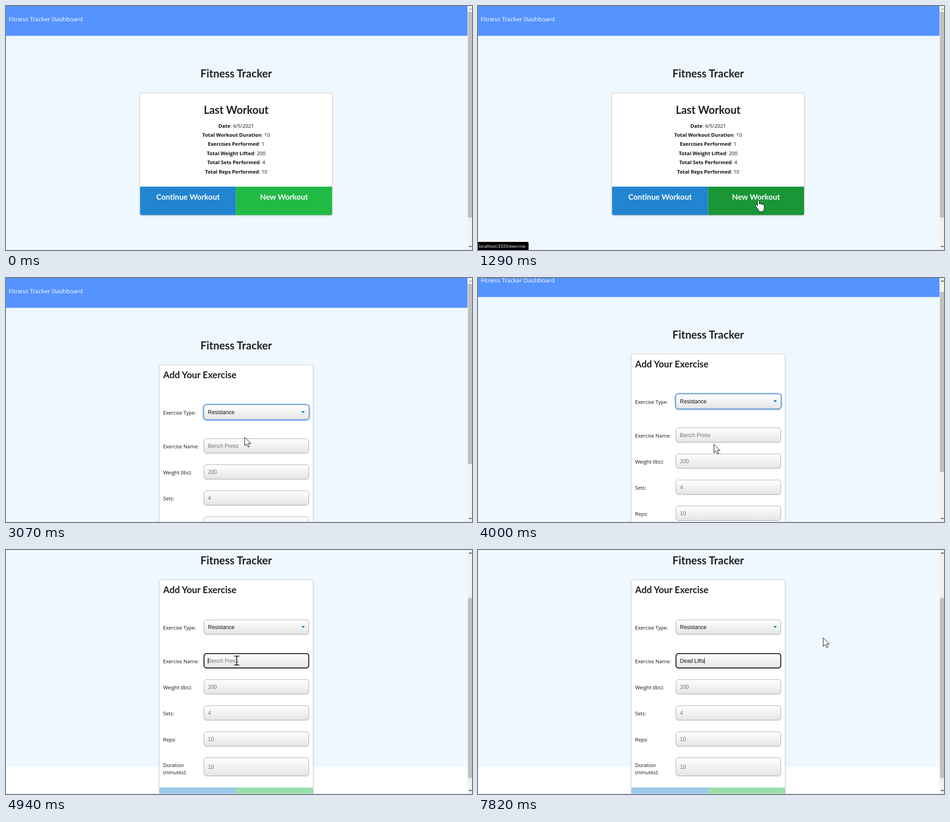
An HTML page that plays this animation: 1032x543 px, repeating every 8000 ms.

```html
<!DOCTYPE html>
<html lang="en">
<head>
<meta charset="utf-8">
<title>Fitness Tracker</title>
<style>
  html, body { margin: 0; width: 100%; height: 100%; overflow: hidden; background: #fff; }
  svg { display: block; width: 1032px; height: 543px; }
  text { white-space: pre; }
  .ui { font-family: "Open Sans", "Noto Sans", sans-serif; font-size: 11.15px; fill: #111; }
  .nav { font-size: 13.3px; fill: #fff; }
  .tip { font-size: 9.56px; fill: #fff; }
  .head { font-family: Lato, sans-serif; font-weight: 700; fill: #1f2021; }
  .h1 { font-size: 23.8px; }
  .h2 { font-size: 20.4px; }
  .btn { font-size: 17px; fill: #fff; }
  .field { font-family: "Liberation Sans", Arial, sans-serif; font-size: 11.9px; fill: #111; }
  .hint { fill: #757575; }
  .mid { text-anchor: middle; }
  .bold { font-weight: 700; }
  .card { fill: #fff; stroke: #d4d4d5; filter: drop-shadow(0 1px 1.5px rgba(0, 0, 0, .2)); }
  .popup { fill: #fff; stroke: #8a8a8a; filter: drop-shadow(0 2px 3px rgba(0, 0, 0, .3)); }
  .pointer { fill: #fff; stroke: #000; stroke-linejoin: round; }
</style>
</head>
<body>
<svg id="stage" viewBox="0 0 1032 543"></svg>
<script>
const LOOP = 8000;
const BLUE = '#2185d0', GREEN = '#21ba45', PRESSED = '#1a9637';
const CENTER = 509.7;

const text = (cls, x, y, content, extra = '') =>
  `<text class="${cls}" x="${x}" y="${y}" ${extra}>${content}</text>`;
const rect = (x, y, w, h, attrs) =>
  `<rect x="${x}" y="${y}" width="${w}" height="${h}" ${attrs}/>`;
const group = (id, content) => `<g id="${id}">${content}</g>`;

// A pair of buttons filling the foot of a card
function buttons(x, y, w, h, left, right, baseline, id) {
  const r = 3.4, half = w / 2;
  return `<path fill="${BLUE}" d="M${x} ${y}h${half}v${h}h${r - half}q${-r} 0 ${-r} ${-r}z"/>
    <path id="${id}" fill="${GREEN}" d="M${x + half} ${y}h${half}v${h - r}q0 ${r} ${-r} ${r}h${r - half}z"/>` +
    text('head btn mid', x + half / 2, baseline, left) +
    text('head btn mid', x + half * 1.5, baseline, right);
}

const card = (x, y, w, h, id) => rect(x, y, w, h, `id="${id}" class="card" rx="3.4"`);

const field = (y, h = 32, id = '') =>
  rect(438.5, y + 1.5, 232, h, 'rx="6" fill="none" stroke="#000" stroke-opacity=".05" stroke-width="2"') +
  rect(438.5, y, 232, h, `id="${id}" rx="5.5" fill="url(#shade)" stroke="#aaa"`);

const row = (label, value, y, id = '') =>
  text('ui', 348, y + 21.5, label) + field(y, 32, id) +
  text('field hint', 447.3, y + 20.5, value, id && `id="${id}Text"`);

const summary = [
  ['Date', '4/5/2021'], ['Total Workout Duration', 10], ['Exercises Performed', 1],
  ['Total Weight Lifted', 200], ['Total Sets Performed', 4], ['Total Reps Performed', 10]
].map(([name, value], i) => text('ui mid', CENTER, 270.5 + i * 20.4,
  `<tspan class="bold">${name}</tspan>: ${value}`)).join('');

const home = card(296.5, 193.5, 426, 272, 'homeCard') +
  text('head h1 mid', CENTER, 239.5, 'Last Workout') + summary +
  buttons(297, 402, 425, 63.2, 'Continue Workout', 'New Workout', 430.5, 'newButton');

const details = row('Exercise Name:', 'Bench Press', 357.5, 'name') +
  row('Weight (lbs):', '200', 415.5) + row('Sets:', '4', 473.5) + row('Reps:', '10', 531.5) +
  text('ui', 348, 610, 'Duration') + text('ui', 348, 626, '(minutes):') +
  field(589.5, 40) + text('field hint', 447.3, 614, '10') +
  rect(447, 367, 1, 13, 'id="caret"');

const options = ['Select Exercise Type', 'Resistance', 'Cardio'];
const popup = rect(438.5, 315.5, 232, 78, 'class="popup"') +
  rect(439, 316, 231, 26, 'id="choice" fill="#1e90ff"') +
  options.map((o, i) => text('field option', 447.3, 333 + i * 26, o)).join('');

const form = card(339.5, 193.5, 340.5, 190.5, 'formCard') +
  text('head h2', 348, 223, 'Add Your Exercise') +
  text('ui', 348, 304, 'Exercise Type:') +
  rect(437, 281.2, 235, 35, 'id="ring" rx="7.5" fill="none" stroke="#3b99fc" stroke-opacity=".7" stroke-width="3"') +
  field(282.5, 32, 'type') + text('field', 447.3, 303, '', 'id="typeText"') +
  '<path d="M654.8 296.8h6.4L658 300z" fill="#007cb2" stroke="#007cb2" stroke-linejoin="round"/>' +
  group('details', details) +
  `<g id="foot" opacity=".45">${buttons(340, 340.5, 340, 43.2, 'Complete', 'Add Exercise', 369, 'addButton')}</g>` +
  group('popup', popup);

const pointers = {
  arrow: '<path class="pointer" d="M.5.5V19.5L5 15.3 8.2 22.3 11.2 21 8 14.2H14.3z"/>',
  hand: `<path class="pointer" d="M-2 2a2 2 0 0 1 4 0v7q0-1.5 1.8-1.5t2 2q.3-1.2 1.9-1t1.8 2q.4-1 1.7-.8t1.6 2v6
    q0 3-1.5 5v3H1v-2.5q-1.5-2-3-4.5l-4.5-6q-.8-1.8.8-2.6 1.5-.4 2.7 1.2L-2 13.5z"/>`,
  ibeam: ['#fff" stroke-width="3.4', '#000" stroke-width="1.7'].map(stroke =>
    `<path fill="none" stroke="${stroke}" d="M-6-10h4q2 0 2 2V8q0 2-2 2h-4M6-10h-4q-2 0-2 2M6 10h-4q-2 0-2-2"/>`).join('')
};

document.getElementById('stage').innerHTML =
  `<defs><linearGradient id="shade" x2="0" y2="1"><stop stop-color="#fff"/>
    <stop offset="1" stop-color="#e5e5e5"/></linearGradient></defs>` +
  group('page', rect(0, 0, 1022, 610, 'fill="#f0f8ff"') + rect(0, 0, 1022, 66.3, 'fill="#5593ff"') +
    text('ui nav', 6, 34, 'Fitness Tracker Dashboard') +
    text('head h1 mid', CENTER, 158.5, 'Fitness Tracker') +
    group('home', home) + group('form', form)) +
  rect(1022, 0, 10, 543, 'fill="#f1f1f1"') +
  rect(1023, 13, 9, 458, 'id="thumb" fill="#c1c1c1"') +
  '<path id="up" d="M1025 8l3.5-3.5L1032 8z"/><path fill="#505050" d="M1025 534l3.5 3.5L1032 534z"/>' +
  rect(0, 542, 1032, 1, 'fill="#e4e8ec"') +
  group('status', '<path d="M0 525h109q3 0 3 3v15H0z"/>' + text('ui tip', 1.5, 538, 'localhost:3333/exercise')) +
  '<circle id="click" r="16" fill="#ff0" opacity=".5"/>' +
  group('cursor', Object.entries(pointers).map(([id, art]) => group(id, art)).join(''));

const el = {};
document.querySelectorAll('[id]').forEach(node => el[node.id] = node);
const optionTexts = document.querySelectorAll('.option');
const caretX = [447.3];

// start, end, number of steps, x, y, shape
const moves = [
  [210, 660, 6, 700, 450, 'arrow'],
  [735, 820, 2, 621, 432, 'hand'],
  [1910, 2070, 3, 545, 301, 'arrow'],
  [2690, 2842, 3, 528, 354, 'arrow'],
  [3220, 3300, 2, 528, 338, 'arrow'],
  [3540, 3700, 3, 524, 374, 'ibeam'],
  [4000, 4080, 2, 520, 365, 'arrow'],
  [4480, 4700, 4, 511, 246, 'ibeam'],
  [5080, 5160, 2, 585, 268, 'arrow'],
  [5240, 5320, 2, 690, 262, 'arrow'],
  [5400, 5480, 2, 764, 195, 'arrow']
];
const scrolls = [[4000, 24], [4080, 64], [4160, 102], [4240, 120], [4320, 127]];
const fades = [[970, .6], [1060, 1], [1600, .7], [1680, .35], [1760, 0]];
const typed = 'Dead Lifts';
const keyTimes = [6010, 6240, 6410, 6470, 6730, 7190, 7340, 7570, 7660, 7820];

const between = (t, a, b) => t >= a && t < b;
const show = (node, on) => node.style.display = on ? '' : 'none';
const latest = (list, t) => list.reduce((value, [at, next]) => t >= at ? next : value, 0);
const set = (node, attrs) => Object.entries(attrs).forEach(([k, v]) => node.setAttribute(k, v));

function cursorAt(t) {
  let x = 975, y = 550, shape = 'arrow';
  for (const [start, end, steps, toX, toY, next] of moves) {
    if (t < start) break;
    const part = t >= end ? 1 : (Math.floor((t - start) / (end - start) * (steps - 1)) + 1) / steps;
    x += (toX - x) * part;
    y += (toY - y) * part;
    shape = next;
    if (part < 1) break;
  }
  return { x, y, shape };
}

function drawForm(t) {
  const open = t >= 2994, editing = t >= 4940;
  const hovered = between(t, 1990, 2290);
  set(el.formCard, { height: open ? 505.5 : 190.5 });
  set(el.foot, { transform: `translate(0 ${open ? 315 : 0})` });
  show(el.details, open);
  show(el.ring, between(t, 2290, 4940));
  set(el.type, { stroke: hovered ? '#888' : '#aaa' });
  el.typeText.textContent = options[open ? 1 : 0];

  show(el.popup, between(t, 2290, 2994));
  const chosen = t >= 2766 ? 1 : 0;
  set(el.choice, { y: 316 + chosen * 26 });
  optionTexts.forEach((node, i) => node.style.fill = i === chosen ? '#fff' : '#111');

  const count = keyTimes.filter(at => t >= at).length;
  set(el.name, { stroke: editing ? '#101010' : '#aaa', 'stroke-width': editing ? 2 : 1 });
  el.nameText.textContent = count ? typed.slice(0, count) : 'Bench Press';
  el.nameText.style.fill = count ? '#111' : '';
  show(el.caret, editing && !between(t, 5440, 6010));
  const width = count ? el.nameText.getComputedTextLength() : 0;
  set(el.caret, { x: Math.round(447.3 + width) });
}

function draw() {
  const t = performance.now() % LOOP;
  const onForm = t >= 1450, scroll = latest(scrolls, t);
  show(el.home, !onForm);
  show(el.form, onForm);
  set(el.newButton, { fill: t >= 1220 ? PRESSED : GREEN });
  if (onForm) drawForm(t);

  set(el.page, { transform: `translate(0 ${-scroll})` });
  set(el.thumb, { y: 13 + scroll * .736, height: t >= 2994 ? 401 : 458 });
  set(el.up, { fill: scroll ? '#505050' : '#a3a3a3' });
  set(el.status, { opacity: latest(fades, t) });

  const { x, y, shape } = cursorAt(t);
  set(el.cursor, { transform: `translate(${x} ${y})` });
  for (const id in pointers) show(el[id], id === shape);
  set(el.click, { cx: x, cy: y });
  show(el.click, between(t, 1220, 1290) || between(t, 2220, 2290) || between(t, 2918, 2994));
  requestAnimationFrame(draw);
}
draw();
</script>
</body>
</html>
```
